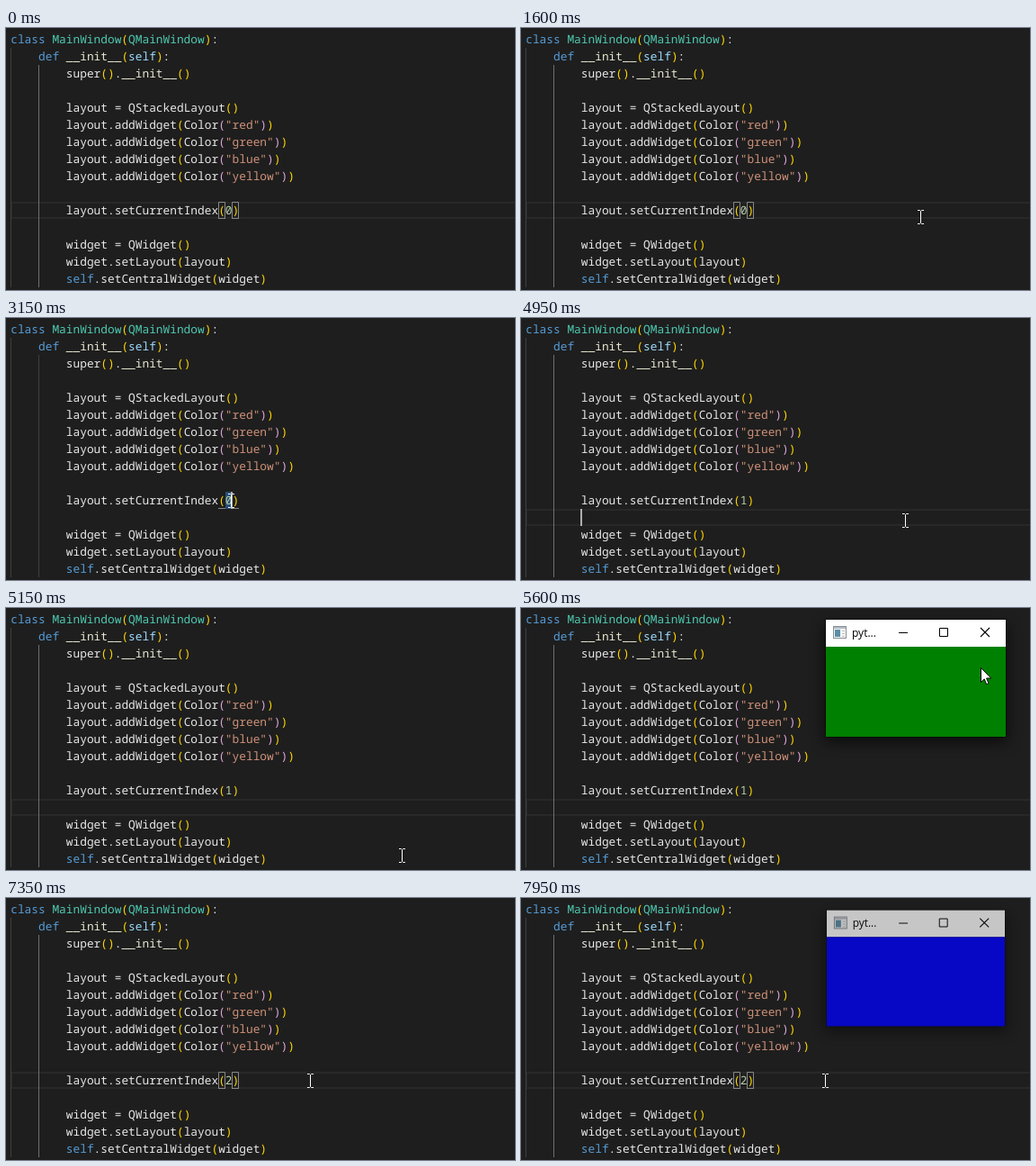
Write an HTML page that moves like this. It is 566 by 291 pixels and loops after 8000 ms.

```html
<!DOCTYPE html>
<html lang="en">
<head>
<meta charset="utf-8">
<title>Stacked layout</title>
<style>
  html, body { margin: 0; width: 566px; height: 291px; overflow: hidden; background: #1e1e1e; }
  svg { display: block; }
  #code text { font: 500 12.83px "Noto Sans Mono", "DejaVu Sans Mono", monospace; white-space: pre; text-rendering: geometricPrecision; }
  #title { font: 12px "Open Sans", "Noto Sans", sans-serif; }
  #shadow { filter: blur(8px); }
</style>
</head>
<body>
<svg width="566" height="291" viewBox="0 0 566 291">
  <rect width="566" height="291" fill="#1e1e1e"/>
  <rect id="line" x="6" width="570" height="17" fill="none" stroke="#282828" stroke-width="2"/>
  <path d="M5.5 22V288" stroke="#404040"/>
  <path id="guide" d="M36.5 41V288"/>
  <rect id="pick" x="244" y="193" width="7.5" height="19" fill="#264f78"/>
  <g id="marks" fill="none" stroke="#888">
    <path id="boxes" d="M236.5 193.5h7v18h-7zM251.5 193.5h7v18h-7z"/>
    <path d="M236 211.5h8M251 211.5h8"/>
  </g>
  <g id="code"></g>
  <rect id="caret" width="2" height="19" fill="#aeafad"/>
  <g id="win">
    <rect id="shadow" x="337" y="19" width="204" height="130" fill="#000" opacity=".6"/>
    <rect x="338.5" y="12.5" width="201" height="131" fill="none" stroke="#000" stroke-opacity=".4"/>
    <rect x="339" y="13" width="200" height="30" fill="#fff"/>
    <rect id="body" x="339" y="43" width="200" height="100"/>
    <rect x="347.5" y="20.5" width="14" height="13" fill="#f4f4f4" stroke="#8a8f94"/>
    <path d="M348 22h13" stroke="#b4bcc4" stroke-width="2"/>
    <rect x="349" y="24" width="6" height="8" fill="#5b8fa8"/>
    <path d="M357 25.5h3M357 28.5h3M357 31.5h3" stroke="#c4c4c4"/>
    <text id="title" x="368" y="32">pyt...</text>
    <rect id="hot" x="494" y="13" width="45" height="30" fill="#e81123"/>
    <path d="M420 27.5h10M465.5 22.5h9v9h-9z" fill="none" stroke="#000"/>
    <path id="cross" d="M511 22l10 10M521 22l-10 10" stroke-width="1.1"/>
  </g>
  <g id="mouse">
    <path id="beam" d="M-3.5 -7.5h2.5l1 1l1 -1h2.5M0 -6.5V6.5M-3.5 7.5h2.5l1 -1l1 1h2.5" fill="none" stroke="#fff"/>
    <path id="arrow" d="M.5 .5v16l3.7 -3.6l2.5 5.8l2.4 -1l-2.5 -5.7h5.2z" fill="#fff" stroke="#000"/>
  </g>
</svg>
<script>
const $ = id => document.getElementById(id);
const LOOP = 8000, STEP = 50, BLINK = 315, FADE = 200;
const CHAR = 7.7, ROW = 19;

const source = `class MainWindow(QMainWindow):
    def __init__(self):
        super().__init__()

        layout = QStackedLayout()
        layout.addWidget(Color("red"))
        layout.addWidget(Color("green"))
        layout.addWidget(Color("blue"))
        layout.addWidget(Color("yellow"))

        layout.setCurrentIndex(0)

        widget = QWidget()
        widget.setLayout(layout)
        self.setCentralWidget(widget)`;

const rules = [
  [/^(class|def|self(?=\.))\b/, '#569cd6'],
  [/^Q?MainWindow\b/, '#4ec9b0'],
  [/^__init__/, '#e6e6d0'],
  [/^self/, '#9cdcfe'],
  [/^"\w+"/, '#ce9178'],
  [/^\d/, '#b5cea8'],
  [/^[()]/, null],
  [/^\w+|^[^\w()"]+/, '#e8e8e8']
];
const brackets = ['#ffd700', '#dfa6dc'];

function svg(tag, attrs, parent) {
  const el = document.createElementNS('http://www.w3.org/2000/svg', tag);
  set(el, attrs);
  return parent.appendChild(el);
}
function set(el, attrs) {
  for (const k in attrs) el.setAttribute(k, attrs[k]);
}
const show = (id, on) => set($(id), { visibility: on ? 'inherit' : 'hidden' });

let digit;
source.split('\n').forEach((text, row) => {
  let rest = text.trimStart(), depth = 0;
  const x = 5.2 + (text.length - rest.length) * CHAR;
  const line = svg('text', { x, y: 17 + ROW * row }, $('code'));
  while (rest) {
    const [rule, color] = rules.find(([r]) => r.test(rest));
    const word = rest.match(rule)[0];
    let fill = color;
    if (word === '(') fill = brackets[depth++];
    if (word === ')') fill = brackets[--depth];
    const span = svg('tspan', { fill }, line);
    span.textContent = word;
    if (/^\d$/.test(word)) digit = span;
    rest = rest.slice(word.length);
  }
});

// Each edit sets the caret and restarts its blinking.
const edits = [
  { at: 645, col: 33, row: 10, index: 0 },
  { at: 3000, col: 32, row: 10, index: 0, selected: true },
  { at: 3565, col: 32, row: 10, index: 1, typed: true },
  { at: 4275, col: 8, row: 11, index: 1 },
  { at: 6700, col: 32, row: 10, index: 1, selected: true },
  { at: 6850, col: 32, row: 10, index: 2, typed: true },
  { at: 7025, col: 33, row: 10, index: 2 }
];

// Places the pointer travels to.
const digitSpot = { x: 250, y: 203 }, closeSpot = { x: 516, y: 25 };
const moves = [
  { from: 500, to: 700, x: 444, y: 210 },
  { from: 1850, to: 2300, ...closeSpot },
  { from: 2450, to: 2950, ...digitSpot },
  { from: 3250, to: 3550, x: 446, y: 283 },
  { from: 4150, to: 4350, x: 427, y: 225 },
  { from: 5000, to: 5200, x: 442, y: 284 },
  { from: 5200, to: 5600, x: 511, y: 66 },
  { from: 5950, to: 6100, ...closeSpot },
  { from: 6250, to: 6650, ...digitSpot },
  { from: 6850, to: 7050, x: 338, y: 203 }
];
const entry = { x: 467, y: 277 };

const windows = [{ open: 1650, close: 2450 }, { open: 5200, close: 6200 }, { open: 7900, close: Infinity }];
const colors = ['#f00', '#008000', '#00f'];

// Typing hides the pointer until it moves again.
function pointer(t) {
  const i = moves.findLastIndex(m => m.from <= t);
  if (i < 0) return null;
  const a = moves[i - 1] || entry, b = moves[i];
  if (edits.some(e => e.typed && e.at <= t && e.at > b.from)) return null;
  let u = Math.min(1, (t - b.from) / (b.to - b.from));
  u = u * u * (3 - 2 * u);
  return { x: Math.round(a.x + (b.x - a.x) * u), y: Math.round(a.y + (b.y - a.y) * u) };
}

function drawWindow(t, index) {
  const w = windows.find(w => t >= w.open && t < w.close + FADE - STEP);
  show('win', w);
  if (!w) return false;
  const closing = t >= w.close;
  const u = Math.min(1, (t - (closing ? w.close : w.open) + STEP) / FADE);
  const opacity = closing ? 1 - u : 1 - (1 - u) ** 2;
  const scale = 0.96 + 0.04 * opacity;
  set($('win'), { opacity, transform: `translate(439 78) scale(${scale}) translate(-439 -78)` });
  set($('body'), { fill: colors[index] });
  return !closing;
}

function drawEditor(t, edit) {
  const { at, col, row, index, selected } = edit;
  const focused = !windows.some(w => t >= w.open - STEP && t < w.close);
  const lit = t >= at && Math.floor((t - at) / BLINK) % 2 === 0;
  const y = 3 + ROW * row;
  digit.textContent = index;
  set($('caret'), { x: Math.floor(4.5 + CHAR * col), y });
  set($('line'), { y: y + 1 });
  set($('guide'), { stroke: selected ? '#404040' : '#707070' });
  show('caret', focused && lit);
  show('line', !selected);
  show('pick', selected);
  show('marks', row === 10);
  show('boxes', !selected);
}

function drawPointer(p, open) {
  const over = p && open && p.x >= 339 && p.x < 540 && p.y >= 13 && p.y < 143;
  const hot = over && p.x >= 494 && p.y < 43;
  show('mouse', p);
  show('arrow', over);
  show('beam', !over);
  show('hot', hot);
  set($('cross'), { stroke: hot ? '#fff' : '#000' });
  if (p) set($('mouse'), { transform: `translate(${p.x + (over ? 0 : 0.5)} ${p.y})` });
}

function draw(t) {
  const edit = edits.findLast(e => e.at <= t) || edits[0];
  drawEditor(t, edit);
  drawPointer(pointer(t), drawWindow(t, edit.index));
}

const start = performance.now();
function tick() {
  const t = (performance.now() - start) % LOOP;
  draw(Math.floor(t / STEP) * STEP);
  requestAnimationFrame(tick);
}
tick();
</script>
</body>
</html>
```
